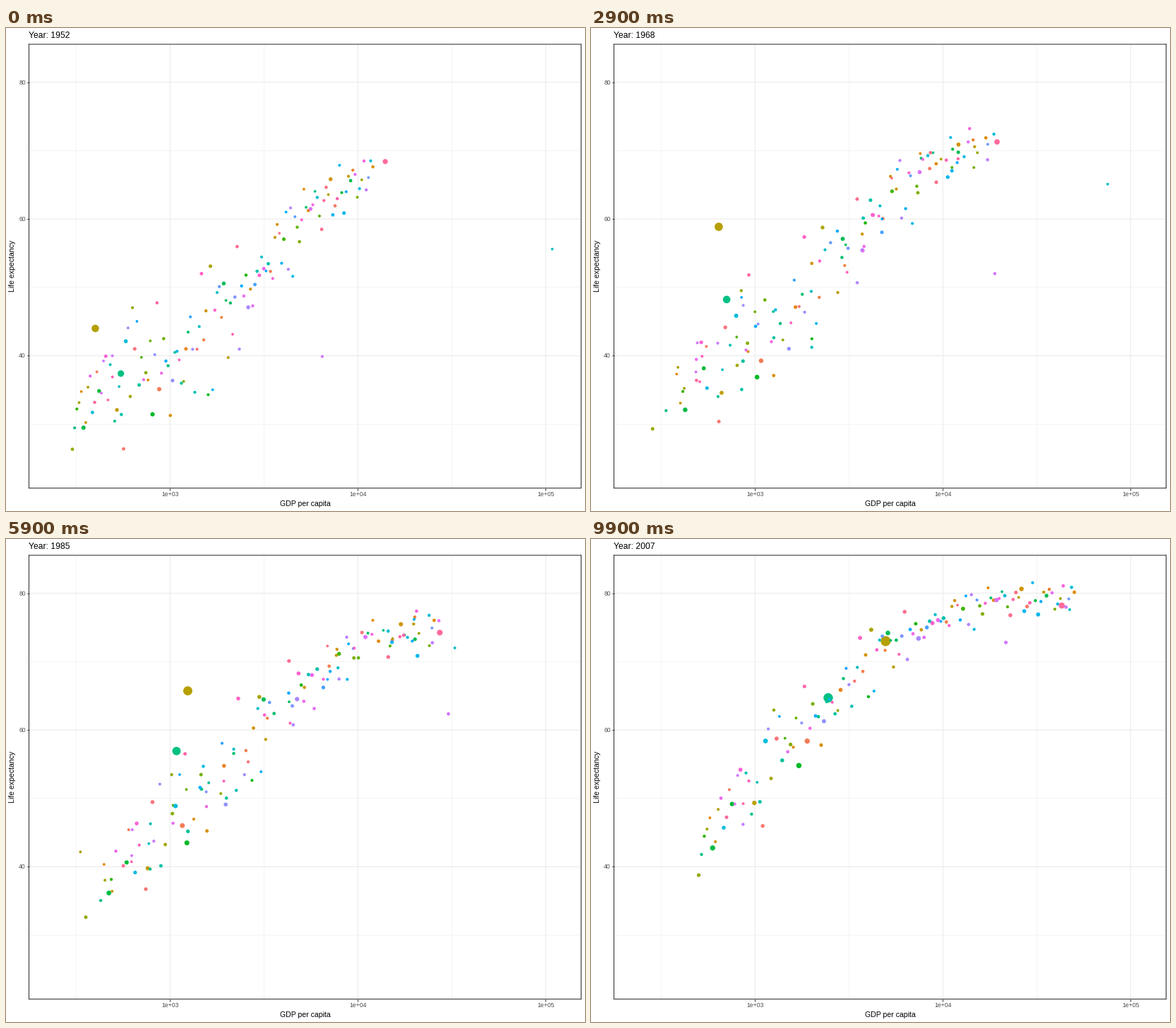
These frames come from a looping animation (820x683 px, 10 s). A matplotlib script:

```python
import numpy as np
import matplotlib.pyplot as plt
from matplotlib.animation import FuncAnimation

W, H, DPI = 820, 683, 64
FRAMES, INTERVAL = 100, 100
START, SPAN, STEPS = 1952, 55, 12
N = 142
LEFT, RIGHT, TOP, BOTTOM = 32.5, 814.5, 23, 650.6
XLIM, YLIM = (2.2487, 5.1887), (20.65, 85.55)
INK, GRID, GREY = "#333333", "#EBEBEB", "#4D4D4D"

plt.rcParams["font.family"] = "Liberation Sans"


def pt(px):
    return px * 72 / DPI


def hue_palette(n, lum=65, chroma=100):
    """Evenly spaced hues in polar LUV, converted to sRGB."""
    h = np.radians(15 + 360 * np.arange(n) / n)
    y = ((lum + 16) / 116) ** 3
    u = chroma * np.cos(h) / (13 * lum) + 0.1978
    v = chroma * np.sin(h) / (13 * lum) + 0.4683
    xyz = np.array([9 * y * u / (4 * v), np.full(n, y),
                    (12 - 3 * u - 20 * v) * y / (4 * v)])
    m = np.array([[3.2405, -1.5371, -0.4985],
                  [-0.9693, 1.8760, 0.0416],
                  [0.0556, -0.2040, 1.0572]])
    lin = np.clip(m @ xyz, 0, 1)
    rgb = np.where(lin > 0.00304, 1.055 * lin ** (1 / 2.4) - 0.055, 12.92 * lin)
    return np.clip(rgb, 0, 1).T


def diameter(pop):
    """Dot width in px for a population in millions (area scale)."""
    return 2.134 * (1 + 5 * np.sqrt(pop / 1318.7)) + 1.41


def wander(rng, n, step):
    """Random walks that return to zero at both ends."""
    walk = np.cumsum(rng.normal(0, step, (n, STEPS)), axis=1)
    walk -= walk[:, :1]
    return walk - walk[:, -1:] * np.linspace(0, 1, STEPS)


# Dots that stand out: hue slot, millions at start and end, (year, gdp, life) points
LEADS = [
    (24, 556, 1319, [(1952, 400, 44), (1962, 488, 44.5), (1967, 613, 58.4),
                     (1992, 1656, 68.7), (2007, 4959, 73)]),
    (58, 372, 1110, [(1952, 547, 37.4), (1977, 813, 54.2), (2007, 2452, 64.7)]),
    (134, 158, 301, [(1952, 13990, 68.4), (2007, 42952, 78.2)]),
    (71, 0.2, 2.5, [(1952, 108382, 55.6), (1967, 80895, 64.6), (1982, 31354, 71.3),
                    (2007, 47307, 77.6)]),
    (107, 2.5, 8.9, [(1952, 493, 40), (1987, 848, 44), (1992, 737, 23.6), (2007, 863, 46.2)]),
    (109, 4, 27, [(1952, 6460, 39.9), (1977, 34168, 58.7), (2007, 21655, 72.8)]),
]


def crowd(rng, n):
    """Income spreads evenly in log scale; life follows an S-curve that shifts to the poor."""
    t = np.linspace(0, 1, STEPS)
    rank = rng.permutation(np.linspace(-1, 1, n))[:, None]
    luck = np.clip(rng.normal(size=(n, 1)), -1.9, 1.9)
    s = 1 / (1 + np.exp((0.3 - 0.72 * t - rank) / 0.33))
    x = 3.28 + 0.42 * t + (0.8 + 0.2 * t) * rank + wander(rng, n, 0.03)
    y = 35.5 + 6.5 * t + (35 + 3 * t) * s
    y += (1.2 + 4.8 * (1 - s)) * luck + wander(rng, n, 0.4)
    pop = np.clip(rng.lognormal(1.7, 1.3, (n, 1)), 0.1, 80) * (1 + 1.3 * t)
    return x, y, diameter(pop)


def build():
    rng = np.random.default_rng(12)
    x, y, d = (np.zeros((N, STEPS)) for _ in range(3))
    rest = np.setdiff1d(np.arange(N), [lead[0] for lead in LEADS])
    x[rest], y[rest], d[rest] = crowd(rng, len(rest))
    years = np.linspace(START, START + SPAN, STEPS)
    for slot, p0, p1, points in LEADS:
        when, gdp, life = np.array(points).T
        x[slot] = np.interp(years, when, np.log10(gdp))
        y[slot] = np.interp(years, when, life)
        d[slot] = diameter(np.linspace(p0, p1, STEPS))
    return x, y, d


X, Y, D = build()

fig = plt.figure(figsize=(W / DPI, H / DPI), dpi=DPI, facecolor="white")
ax = fig.add_axes([LEFT / W, 1 - BOTTOM / H, (RIGHT - LEFT) / W, (BOTTOM - TOP) / H])
ax.set(xlim=XLIM, ylim=YLIM)
ax.set_xticks([3, 4, 5], labels=[])
ax.set_yticks([40, 60, 80], labels=[])
ax.set_xticks([2.5, 3.5, 4.5], minor=True)
ax.set_yticks([30, 50, 70], minor=True)
ax.set_axisbelow(True)
ax.grid(which="major", color=GRID, lw=pt(1.07), snap=False)
ax.grid(which="minor", color=GRID, lw=pt(0.53), snap=False)
ax.tick_params(which="major", length=pt(2.75), width=pt(1.07), color=INK)
ax.tick_params(which="minor", length=0)
for spine in ax.spines.values():
    spine.set(color=INK, linewidth=pt(1.07), snap=False)


def label(px, py, text, size, color="black", ha="center", rotation=0):
    return fig.text(px / W, 1 - py / H, text, fontsize=pt(size), color=color, ha=ha,
                    va="baseline", rotation=rotation, rotation_mode="anchor")


for k in (3, 4, 5):
    px = LEFT + (k - XLIM[0]) / (XLIM[1] - XLIM[0]) * (RIGHT - LEFT)
    label(px, 662.3, f"1e+0{k}", 8.6, GREY)
for k in (40, 60, 80):
    py = BOTTOM - (k - YLIM[0]) / (YLIM[1] - YLIM[0]) * (BOTTOM - TOP)
    label(28, py + 3, str(k), 8.6, GREY, ha="right")
label((LEFT + RIGHT) / 2, 675.5, "GDP per capita", 10.5)
label(12.3, (TOP + BOTTOM) / 2, "Life expectancy", 10.5, rotation=90)
title = label(LEFT, 14, "", 12.1, ha="left")

dots = ax.scatter(X[:, 0], Y[:, 0], s=pt(D[:, 0]) ** 2, c=hue_palette(N),
                  linewidths=0, zorder=2)


def update(i):
    t = i / (FRAMES - 1)
    a = min(int(t * (STEPS - 1)), STEPS - 2)
    f = t * (STEPS - 1) - a
    px, py, pd = (v[:, a] * (1 - f) + v[:, a + 1] * f for v in (X, Y, D))
    dots.set_offsets(np.column_stack([px, py]))
    dots.set_sizes(pt(pd) ** 2)
    title.set_text(f"Year: {round(START + SPAN * t)}")
    return dots, title


anim = FuncAnimation(fig, update, frames=FRAMES, interval=INTERVAL,
                     repeat=True, repeat_delay=0, blit=False)
plt.show()
```
